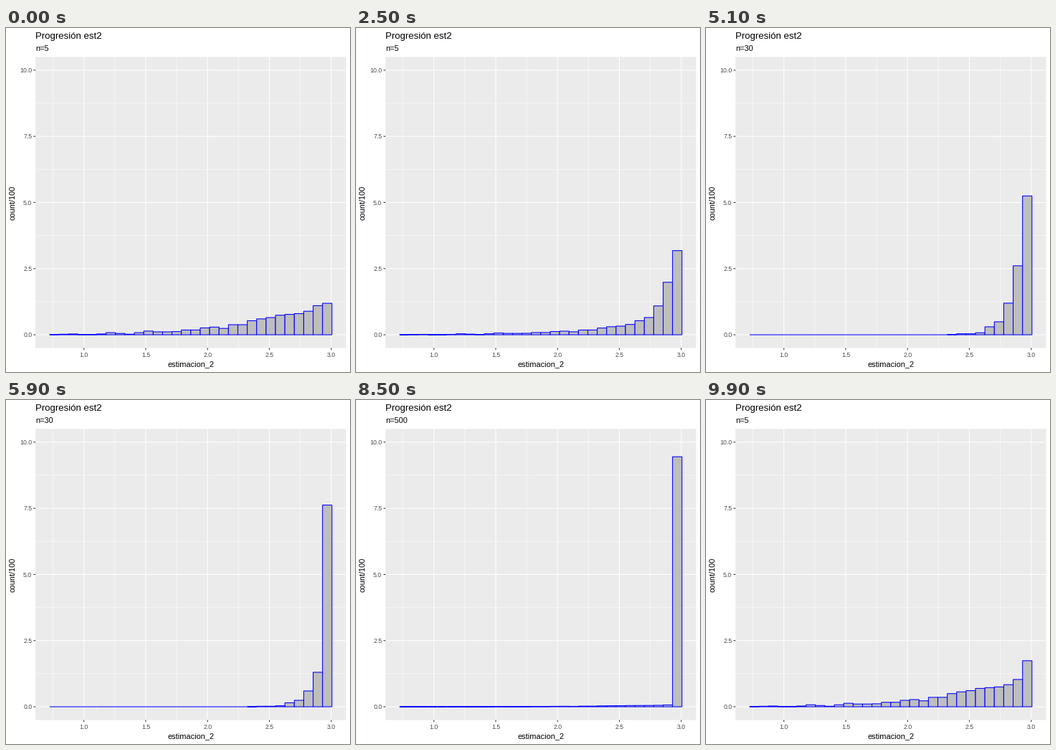
A matplotlib script that plays this animation: 480 by 480 pixels, repeating every 10000 ms.

```python
import matplotlib.pyplot as plt
import numpy as np
from matplotlib.animation import FuncAnimation
from matplotlib.patches import Rectangle

SIZE, FRAMES, INTERVAL = 480, 100, 100
LEFT, RIGHT, TOP, BOTTOM = 41.2, 474.52, 40.4, 446.5
BINS = 30
BIN_WIDTH = 0.0761          # in data units
BAR_LEFT = LEFT + (RIGHT - LEFT) / 22
BAR_W = (RIGHT - LEFT) / 1.1 / BINS
LINE, THIN = 1.07, 0.53

# Samples per bin for each sample size (1000 in total)
small = np.array([1, 2, 3, 1, 1, 3, 8, 5, 2, 8, 14, 11, 11, 12, 18,
                  18, 26, 29, 24, 38, 38, 53, 60, 65, 74, 77, 80, 89, 110, 119])
medium = np.zeros(BINS)
medium[21:] = [1, 4, 4, 8, 32, 52, 127, 277, 495]
large = np.zeros(BINS)
large[-1] = 1000
STATES = [("n=5", small / 100), ("n=30", medium / 100), ("n=500", large / 100)]
# Last still frame and first settled frame of every transition
MOVES = [(16, 33), (50, 67), (84, 100)]


def px(v):
    return BAR_LEFT + (v - 9.5 * BIN_WIDTH) * BAR_W / BIN_WIDTH


def py(v):
    return BOTTOM - (v + 0.5) * (BOTTOM - TOP) / 11


plt.rcParams["font.family"] = "Liberation Sans"
fig = plt.figure(figsize=(SIZE / 72, SIZE / 72), dpi=72, facecolor="white")
ax = fig.add_axes([0, 0, 1, 1])
ax.set_xlim(0, SIZE)
ax.set_ylim(SIZE, 0)
ax.axis("off")


def line(x0, y0, x1, y1, color, width, z):
    ax.plot([x0, x1], [y0, y1], color=color, lw=width, zorder=z,
            solid_capstyle="butt", snap=False)


def label(x, y, s, size, color="black", ha="left", **kw):
    return ax.text(x, y, s, fontsize=size, color=color, ha=ha,
                   va="baseline", **kw)


ax.add_patch(Rectangle((LEFT, TOP), RIGHT - LEFT, BOTTOM - TOP,
                       fc="#EBEBEB", ec="none", zorder=0, snap=False))
for v in np.arange(1.25, 10, 2.5):
    line(LEFT, py(v), RIGHT, py(v), "white", THIN, 1)
for v in np.arange(0.75, 3, 0.5):
    line(px(v), TOP, px(v), BOTTOM, "white", THIN, 1)
for v in np.arange(0, 10.1, 2.5):
    line(LEFT, py(v), RIGHT, py(v), "white", LINE, 2)
    line(LEFT - 2.74, py(v), LEFT, py(v), "#333333", LINE, 2)
    label(LEFT - 4.94, py(v) + 3.2, f"{v:.1f}", 8.8, "#4D4D4D", "right")
for v in np.arange(1, 3.1, 0.5):
    line(px(v), TOP, px(v), BOTTOM, "white", LINE, 2)
    line(px(v), BOTTOM, px(v), BOTTOM + 2.74, "#333333", LINE, 2)
    label(px(v), 459, f"{v:.1f}", 8.8, "#4D4D4D", "center")

label(LEFT, 15, "Progresión est2", 13.2)
subtitle = label(LEFT, 32, "", 11)
label((LEFT + RIGHT) / 2, 472, "estimacion_2", 11, ha="center")
label(13, (TOP + BOTTOM) / 2, "count/100", 11, ha="center",
      rotation=90, rotation_mode="anchor")

bars = [ax.add_patch(Rectangle((BAR_LEFT + i * BAR_W, py(0)), BAR_W, 0,
                               fc="#BEBEBE", ec="blue", lw=LINE,
                               zorder=3, snap=False))
        for i in range(BINS)]


def pose(frame):
    """Subtitle and bar heights at the given frame."""
    for k, (start, end) in enumerate(MOVES):
        if frame <= start:
            return STATES[k]
        if frame < end:
            t = (frame - start) / (end - start)
            (name, a), (next_name, b) = STATES[k], STATES[(k + 1) % 3]
            return (name if t < 0.53 else next_name), a + (b - a) * t
    return STATES[0]


def update(frame):
    name, heights = pose(frame)
    subtitle.set_text(name)
    for bar, h in zip(bars, heights):
        bar.set_height(py(h) - py(0))
    return [subtitle, *bars]


anim = FuncAnimation(fig, update, frames=FRAMES, interval=INTERVAL,
                     init_func=lambda: update(0), repeat=True,
                     repeat_delay=0, blit=False)
plt.show()
```
